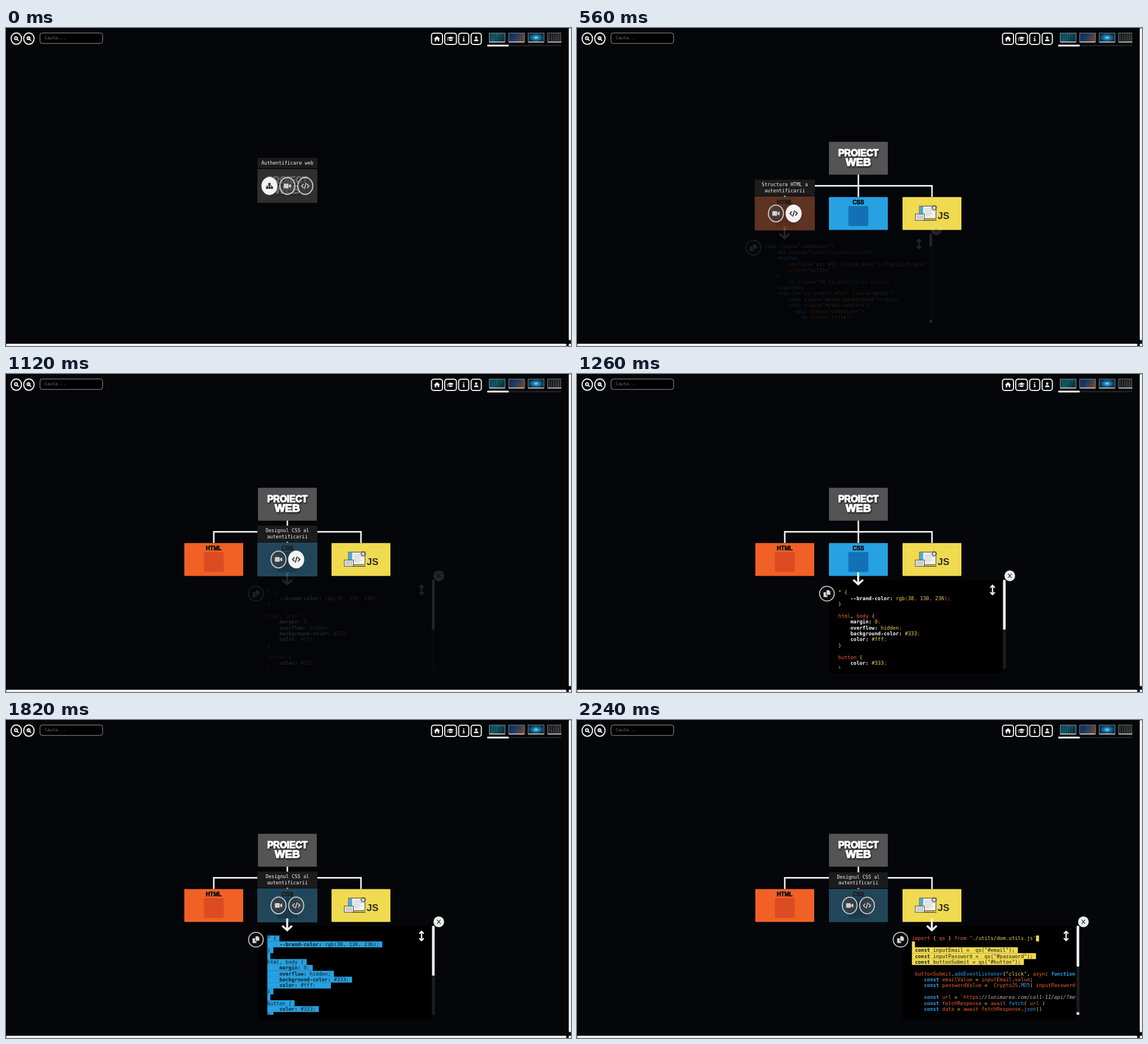
An HTML page that plays this animation: 998x561 px, repeating every 2640 ms.

```html
<!DOCTYPE html>
<html lang="ro">
<head>
<meta charset="utf-8">
<title>Proiect web</title>
<style>
html, body { margin: 0; width: 100%; height: 100%; overflow: hidden; background: #05060a; }
#stage { display: block; width: 998px; height: 561px; }
text { white-space: pre; font-family: "DejaVu Sans Mono", monospace; }
.mid { text-anchor: middle; }
.head { font: bold 17px "Liberation Sans", sans-serif; }
.title { fill: #fff; stroke: #fff; stroke-width: 1.5; stroke-linejoin: round; filter: drop-shadow(1px 2px 1.5px #000b); }
.label { font-size: 10px; stroke: #111; stroke-width: .7; fill: #111; }
.hint { font-size: 8.35px; fill: #f4f4f4; }
.line { fill: none; stroke: #f2f2f2; stroke-width: 2.7; }
.hover { visibility: hidden; }
.on .hover { visibility: visible; }
.btn { color: #cfcfcf; }
.btn ellipse { fill: #4448; stroke: #cfcfcf; stroke-width: 1.8; }
.lit .hot { color: #222; }
.lit .hot ellipse { fill: #f3f3f3; stroke: #f3f3f3; }
.solid { fill: currentColor; }
.thin { fill: none; stroke: currentColor; stroke-width: 1.6; stroke-linecap: round; stroke-linejoin: round; }
.code { font-size: 8.88px; }
.b { fill: #2ba3f0; font-weight: bold; }
.f { fill: #2ba3f0; }
.o { fill: #f0622c; }
.a { fill: #f0622c; font-weight: bold; }
.y { fill: #f3d45c; }
.w { fill: #fff; font-weight: bold; }
.p { fill: #f4f4f4; }
.g { fill: #b5b5b5; font-style: italic; }
.mark { visibility: hidden; }
.picked .mark { visibility: visible; }
.picked .sel tspan { fill: #15191c; }
.copy { color: #d8d8d8; }
.copy circle { fill: #0c0c0e; stroke: #d8d8d8; stroke-width: 1.6; }
.copying .copy { color: #111; }
.copying .copy circle { fill: #f0f0f0; stroke: #f0f0f0; }
.nav { fill: #000; stroke: #eee; stroke-width: 2; }
.icon { color: #eee; }
</style>
</head>
<body>
<svg id="stage" viewBox="0 0 998 561"></svg>
<script>
const icons = {
  tree: `<path class="solid" d="M-2-5h4v3.6h-4zM-6 1.4h3.6V5H-6zM-1.8 1.4h3.6V5h-3.6zM2.4 1.4H6V5H2.4z"/>
    <path class="thin" style="stroke-width:1" d="M0-2V2M-4.2 2V0H4.2V2"/>`,
  video: `<rect class="solid" x="-6.3" y="-4" width="8.4" height="8" rx="1.2"/><path class="solid" d="M2.8-1.5 6.3-3.8V3.8L2.8 1.5z"/>`,
  code: `<path class="thin" d="M-3.4-3-6.4 0-3.4 3M3.4-3 6.4 0 3.4 3M1.4-4.6-1.4 4.6"/>`,
  copy: `<path class="solid" d="M-6-2.5h4.3V3H1V6H-6zM-.7-6H3.4L6-3.6V2H-.7z"/>`,
  home: `<path class="solid" d="M0-4.8 5.2-.2 4 .4V4.5H1.2V1.2H-1.2V4.5H-4V.4L-5.2-.2z"/>`,
  cap: `<path class="solid" d="M0-4 6-1.6 0 .8-6-1.6zM-3.4.4 0 1.8 3.4.4V3Q0 4.8-3.4 3z"/><path class="thin" style="stroke-width:.9" d="M-5.4-1V3.4"/>`,
  info: `<path class="solid" d="M-1-4.4h2v2h-2zM-1.8-1.2H1V2.8H2V4.2H-2V2.8H-1V.2H-1.8z"/>`,
  user: `<circle class="solid" cy="-2" r="2.2"/><path class="solid" d="M-4 4.2Q-4 .9-1 .9H1Q4 .9 4 4.2z"/>`
};
const place = (x, y, body, attrs = "") => `<g transform="translate(${x} ${y})" ${attrs}>${body}</g>`;
const rect = (x, y, w, h, fill, extra = "") => `<rect x="${x}" y="${y}" width="${w}" height="${h}" fill="${fill}" ${extra}/>`;
const esc = s => s.replace(/&/g, "&amp;").replace(/</g, "&lt;");

// Cards: picture, dark veil with buttons, and a hint above
function card(id, fill, art, hint, names, hot, gap) {
  const h = hint.length > 1 ? 28 : 18;
  const buttons = names.map((n, i) => place((i - (names.length - 1) / 2) * gap, 0,
    `<ellipse rx="13" ry="14.6"/>${icons[n]}`, `class="btn ${n === hot ? "hot" : ""}"`)).join("");
  const words = hint.map((s, i) =>
    `<text class="hint mid" y="${-30.5 - h + (h > 20 ? 11.7 : 11.9) + i * 10}">${s}</text>`).join("");
  return `<g id="${id}">${rect(-52, -29, 104, 58, fill, 'rx="1"')}${art}
    <g class="hover">${rect(-52, -29, 104, 58, "#202020", 'opacity=".7"')}
    ${rect(-52, -30.5 - h, 104, h, "#1c1c1d")}${words}${buttons}</g></g>`;
}
const badge = (word, color) =>
  `<text class="head label mid" y="-16.2">${word}</text>${rect(-17.5, -13, 35, 35, color)}`;
const gear = Array.from({ length: 8 }, (_, i) =>
  `<path d="M0-3V-5" stroke="#444" stroke-width="1.4" transform="rotate(${i * 45})"/>`).join("");
const desk = rect(-22, -13, 29, 22, "#f4f4f2", 'stroke="#333"') + rect(-21.5, -12.5, 6, 21, "#4aa8dc") +
  `<path d="M-13-8H0M-13-5H3M-13-2H-1M-13 1H2M-13 4H-3" stroke="#b9c0c4"/>
   <path d="M-16 12H8" stroke="#444" stroke-width="1.4"/>` +
  rect(-29.5, 1, 16, 11, "#eee", 'stroke="#444"') +
  `<path d="M-27 4H-16M-27 6.5H-16M-27 9H-16" stroke="#777" stroke-dasharray="2 1"/>` +
  place(4, -10, `${gear}<circle r="3" fill="#f4f4f2" stroke="#444"/>`) +
  `<text class="head" x="10" y="9.8" fill="#2c2b25">JS</text>`;

// Code panels: "~x" switches to text style x
const CW = 5.346, LH = 10.375;
function listing(lines, color, marked) {
  return lines.map((line, i) => {
    const parts = line.split("~").slice(1);
    const len = parts.join("").length - parts.length;
    const [from, sel] = marked(i, len);
    const mark = from < 0 ? "" : rect(16.6 + from * CW, 17.2 + i * LH, (len + 1 - from) * CW, LH + .1, color, 'class="mark"');
    const spans = parts.map(p => `<tspan class="${p[0]}">${esc(p.slice(1))}</tspan>`).join("");
    return `${mark}<text class="code ${sel ? "sel" : ""}" xml:space="preserve" x="16.6" y="${25.4 + i * LH}">${spans}</text>`;
  }).join("");
}
function panel(id, x, thumb, corner, body) {
  return place(x, 363, rect(0, 0, 307, 165, "#000") +
    `<svg width="307" height="157">${body}</svg>` +
    rect(307.5, 0, 5, 157, "#1d1d1f") + rect(307.5, 0, 4.6, thumb, "#f0f0f0", 'rx="1.5"') +
    (corner ? rect(307.5, 152.5, 4.6, 4.5, "#f0f0f0") : "") +
    `<path d="M51.7-13V7M43 0 51.7 7.8 60.4 0" fill="none" stroke="#f0f0f0" stroke-width="3.6"/>
     <path d="M289 11V25M285 14 289 10 293 14M285 22 289 26 293 22" fill="none" stroke="#f0f0f0" stroke-width="2.4"/>
     <circle cx="319.5" cy="-7" r="9.4" fill="#ececec"/>
     <path d="M316.4-10.6 322.6-3.4M322.6-10.6 316.4-3.4" stroke="#222" stroke-width="1.2"/>` +
    place(-3.5, 24.5, `<circle r="13"/>${icons.copy}`, 'class="copy"'), `id="${id}"`);
}
const htmlCode = [
  '~b<div ~aclass~p=~y"container"~b>',
  '~b    <h3 ~aclass~p=~y"title"~b>~oDashboard~b</h3>',
  '~b    <button',
  `~a        onclick~p=~y"qs('#js_create_elev').classList.add('is-active')"`,
  '~a        class~p=~y"button"',
  '~b    >',
  '~b        <i ~aclass~p=~y"fa fa-plus"~b></i>~o Create',
  '~b    </button>',
  '~b    <div ~aid~p=~y"js_create_elev" ~aclass~p=~y"modal"~b>',
  '~b        <div ~aclass~p=~y"modal-background"~b></div>',
  '~b        <div ~aclass~p=~y"modal-content"~b>',
  '~b          <div ~aclass~p=~y"container"~b>',
  '~b            <p ~aclass~p=~y"title"~b>'
];
const rule = (name, value) => `~w    ${name}: ~y${value}~o;`;
const cssCode = [
  '~y* {', '~w    --brand-color: ~yrgb~o(~y38~o, ~y130~o, ~y236~o);', '~y}', '',
  '~ohtml~p, ~obody ~y{', rule("margin", "0"), rule("overflow", "hidden"),
  rule("background-color", "#333"), rule("color", "#fff") + "    ", '~y}', '',
  '~obutton ~y{', rule("color", "#333"), '~y}'
];
const jsCode = [
  "~oimport ~y{ ~oqs ~y} ~ofrom ~y'./utils/dom.utils.js'", '',
  '~b const ~oinputEmail ~p=  ~fqs~p(~y"#email"~p);',
  '~b const ~oinputPassword ~p=  ~fqs~p(~y"#password"~p);',
  '~b const ~obuttonSubmit ~p= ~fqs~p(~y"#button"~p);', '',
  '~o buttonSubmit~p.~faddEventListener~p(~y"click"~p, ~oasync ~bfunction~p() {',
  '~b    const ~oemailValue ~y= ~oinputEmail~p.~ovalue~p;',
  '~b    const ~opasswordValue ~y=  ~oCryptoJS~p.~fMD5~y( ~oinputPassword.value )', '',
  '~b    const ~ourl ~y= ~p`~ohttps~p:~g//lunimarea.com/call-11/api/?method=login',
  '~b    const ~ofetchResponse ~y= ~oawait ~ffetch~y( ~ourl ~y)',
  '~b    const ~odata ~y= ~oawait fetchResponse~p.~fjson~y()'
];

// Header and page scrollbars
const zoom = (x, sign) => place(x, 18.7, `<ellipse rx="9.2" ry="10" fill="#000" stroke="#eee" stroke-width="2"/>
  <circle cx="-.6" cy="-.8" r="3.5" fill="#eee"/><path d="M1.6 1.4 4 3.8" stroke="#eee" stroke-width="2"/>
  <path d="M-2.5-.8H1.3${sign}" stroke="#111"/>`);
const nav = (x, w, icon) => rect(x, 9.3, w, 19.6, "#000", 'class="nav" rx="4"') + place(x + w / 2, 19, icons[icon], 'class="icon"');
const thumbs = ["teal", "dusk", "spark", "grid"].map((n, i) =>
  rect(853.5 + i * 34.4, 9, 28, 16, `url(#${n})`, 'stroke="#888"') +
  `<path d="M${854 + i * 34.4} 24.6h27" stroke="#ddd" stroke-width="1.4"/>` +
  (i % 3 ? "" : `<path d="M${856 + i * 34.4} 17h24" stroke="${i ? "#777" : "#0a2028"}" opacity=".6" stroke-width="12" stroke-dasharray="1 3"/>`)).join("");
const fade = (id, ...colors) => `<linearGradient id="${id}" x2="1" y2=".4">${colors.map((c, i) =>
  `<stop offset="${i / (colors.length - 1)}" stop-color="${c}"/>`).join("")}</linearGradient>`;
const header = `<defs>${fade("teal", "#0d4a5c", "#15606c", "#0c3544")}${fade("dusk", "#10284f", "#1d3a66", "#6a4334")}
  ${fade("grid", "#111", "#2a2a2c")}<radialGradient id="spark"><stop stop-color="#9fe4ff"/>
  <stop offset=".35" stop-color="#1d86b8"/><stop offset="1" stop-color="#08283f"/></radialGradient></defs>` +
  zoom(18.2, "M-.6-2.7V1.1") + zoom(40.4, "") +
  rect(60, 8.8, 110.7, 18.4, "#000", 'rx="4" stroke="#999"') +
  `<text x="68.3" y="20" font-size="7.7" fill="#6f6f6f">Cauta...</text>` +
  nav(751.6, 19.4, "home") + nav(775, 20.6, "cap") + nav(799.6, 17.8, "info") + nav(821.6, 18, "user") +
  `<svg width="981" height="40">${thumbs}</svg>` +
  rect(850, 29.8, 131, 2.4, "#222") + rect(850, 29.6, 38, 2.8, "#fff", 'rx="1"') +
  rect(994, 0, 4, 561, "#000") + rect(0, 557, 998, 4, "#000") +
  rect(994, 0, 4, 551, "#eee", 'rx="2"') + rect(0, 557, 990, 4, "#eee", 'rx="2"') + rect(994, 557, 4, 4, "#eee");

const title = `<g class="title"><text class="head mid" style="font-size:16px" y="-4.2">PROIECT</text>
  <text class="head mid" style="font-size:19px" y="13.6">WEB</text></g>`;
const tip = `<g id="tip">${rect(379, 347.2, 117.5, 23.4, "#eee", 'rx="3" stroke="#222" style="filter:drop-shadow(1px 1px 1px #000)"')}
  ${["Codul a fost", "copiat in clipboard!"].map((s, i) =>
    `<text class="mid" x="437.7" y="${357.8 + i * 7.4}" style="font:bold 7px 'Liberation Sans',sans-serif;letter-spacing:.2px" fill="#222">${s}</text>`).join("")}</g>`;

const stage = document.getElementById("stage");
stage.innerHTML = header +
  `<path id="lines" class="line" d="M497 250V298M367 298V278.4H627V298"/>` +
  card("root", "#545454", title, ["Authentificare web"], ["tree", "video", "code"], "tree", 31) +
  card("html", "#f16126", badge("HTML", "#dd4b22"), ["Structura HTML a", "autentificarii"], ["video", "code"], "code", 30.6) +
  card("css", "#27a1e1", badge("CSS", "#1271b5"), ["Designul CSS al", "autentificarii"], ["video", "code"], "code", 30.6) +
  card("js", "#f0da50", desk, ["Functionalitatea", "autentificarii"], ["video", "code"], "code", 30.6) +
  panel("htmlPanel", 315, 22, true, listing(htmlCode, "#f16126", () => [-1, false])) +
  panel("cssPanel", 445, 88, false, listing(cssCode, "#27a1e1", () => [0, true])) +
  panel("jsPanel", 575, 72, true, listing(jsCode, "#f0da50", (i, len) => i > 4 ? [-1, false] : [i ? 0 : len, i > 0])) + tip;

const el = id => document.getElementById(id);
const LOOP = 2640, STEP = 140, LAST = 16;
let shown = -1;

function pose(id, x, y, scale, alpha, hover, lit) {
  const g = el(id);
  g.setAttribute("transform", `translate(${x} ${y}) scale(${scale})`);
  g.setAttribute("opacity", alpha);
  g.classList.toggle("on", hover);
  g.classList.toggle("lit", lit);
}
function draw(step) {
  const at = (a, b = a) => step >= a && step <= b;
  const show = (id, alpha) => el(id).setAttribute("opacity", alpha);
  const swell = on => on ? 1.02 : 1;

  // The branch spreads out while the root rises
  const drift = [24, 5, 1][step] || 0;
  const grow = step === 1 ? .75 : 1;
  const alpha = [0, .5, .95][step] ?? 1;
  pose("root", 497, step ? 229.8 + 2 * drift : 278.6, swell(step === 0), 1, step === 0, step === 0);
  pose("html", 367 + 8 * drift, 327.2, grow * swell(at(3, 4)), alpha, at(3, 4), at(4));
  pose("css", 497 + 2 * drift, 327.2, grow * swell(at(6, 8) || at(13)), alpha, at(6, 8) || at(13, LAST), at(7, 8));
  pose("js", 627 - 4 * drift, 327.2, grow * swell(at(14)), alpha, at(14), at(14));
  show("lines", step > 1 ? 1 : 0);

  const open = (from, to) => at(from) ? .13 : at(from + 1, to) ? 1 : 0;
  show("htmlPanel", open(4, 7));
  show("cssPanel", open(8, 13));
  show("jsPanel", open(14, LAST));
  el("cssPanel").classList.toggle("copying", at(10, 11));
  el("cssPanel").classList.toggle("picked", at(11, 13));
  el("jsPanel").classList.toggle("picked", at(LAST));
  show("tip", at(11) ? 1 : at(12) ? .4 : 0);
}
function tick() {
  const step = Math.min(LAST, Math.floor(performance.now() % LOOP / STEP));
  if (step !== shown) draw(shown = step);
  requestAnimationFrame(tick);
}
tick();
</script>
</body>
</html>
```
